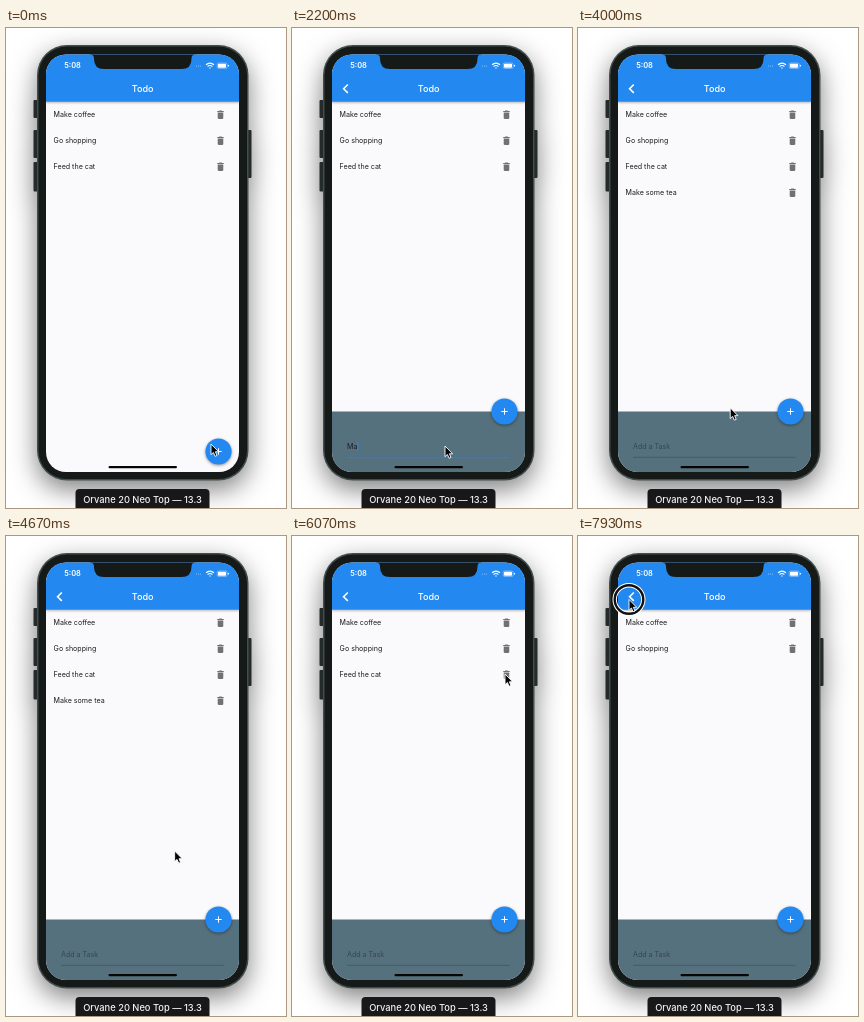
Recreate the animation shown at these times as an HTML page. Size 280 by 480 pixels, loop 8000 ms.

```html
<!DOCTYPE html>
<html lang="en">
<head>
<meta charset="utf-8">
<title>Todo</title>
<style>
  html, body { margin: 0; width: 100%; height: 100%; overflow: hidden; background: #fff; }
  svg { display: block; width: 100%; height: 100%; font-family: Inter, Roboto, sans-serif; }
  .body { filter: drop-shadow(0 9px 13px rgba(0, 0, 0, .5)); }
  .bar { filter: drop-shadow(0 1px 1px rgba(0, 0, 0, .3)); }
  .disc { filter: drop-shadow(0 1.5px 1.6px rgba(0, 0, 0, .4)); }
  .small { font-size: 7.1px; fill: #1c1c1d; white-space: pre; }
</style>
</head>
<body>
<svg viewBox="0 0 280 480">
  <defs>
    <clipPath id="screen"><rect x="40" y="26.5" width="193" height="417.5" rx="20"/></clipPath>
    <path id="bin" fill="#717173" transform="translate(208.9 81.2) scale(.466)"
      d="M6 19c0 1.1.9 2 2 2h8c1.1 0 2-.9 2-2V7H6zM19 4h-3.5l-1-1h-5l-1 1H5v2h14z"/>
  </defs>

  <g class="body">
    <g fill="#252b2b">
      <rect x="27.5" y="72" width="5" height="18" rx="1"/>
      <rect x="27.5" y="102" width="5" height="28" rx="1"/>
      <rect x="27.5" y="134" width="5" height="29.5" rx="1"/>
      <rect x="241" y="102" width="4.5" height="48" rx="1"/>
    </g>
    <rect x="31" y="17" width="211.5" height="435.5" rx="30" fill="#424e4c"/>
    <rect x="32.5" y="18.5" width="208.5" height="432.5" rx="28.5" fill="#151918"/>
  </g>

  <g clip-path="url(#screen)">
    <rect x="40" y="26" width="193" height="418" fill="#faf9fc"/>
    <g class="small" id="items">
      <g><text x="47.6" y="89.3">Make coffee</text><use href="#bin"/></g>
      <g transform="translate(0 26)"><text x="47.6" y="89.3">Go shopping</text><use href="#bin"/></g>
      <g transform="translate(0 52)"><text x="47.6" y="89.3">Feed the cat</text><use href="#bin"/></g>
      <g transform="translate(0 78)"><text x="47.6" y="89.3">Make some tea</text><use href="#bin"/></g>
    </g>

    <rect class="bar" x="40" y="20" width="193" height="53.7" fill="#2389f1"/>
    <path fill="#151918" d="M84 26.5Q88 26.5 88 30.5V31Q88 41 98 41H175.500Q185.500 41 185.500 31V30.500Q185.500 26.500 189.500 26.500V20H84Z"/>
    <g fill="#fff">
      <text x="58.2" y="40.400" font-size="7.5" font-weight="600">5:08</text>
      <text x="136.600" y="63.800" font-size="9.100" font-weight="500" text-anchor="middle">Todo</text>
      <g opacity=".5"><circle cx="190.500" cy="38" r=".6"/><circle cx="192.500" cy="38" r=".6"/><circle cx="194.500" cy="38" r=".6"/></g>
      <rect x="212" y="35.800" width="8" height="3.900" rx=".8"/>
      <rect x="222" y="36.800" width=".8" height="1.900" rx=".4"/>
    </g>
    <g fill="none" stroke="#fff">
      <path stroke-width="1.200" d="M200 36.800Q204 33.400 208 36.800M201.600 38.500Q204 36.500 206.400 38.500M203.300 40L204.700 40"/>
      <rect x="211.200" y="35" width="10" height="5.500" rx="1.500" stroke-width=".5" opacity=".7"/>
      <path id="back" stroke-width="1.600" d="M55.800 56.500L51.600 60.700L55.800 64.900"/>
    </g>

    <g id="sheet">
      <rect x="40" y="383.500" width="193" height="61" fill="#56717e"/>
      <path d="M55 429.300H217.500" stroke="#394b54" stroke-width=".6"/>
      <path id="focusLine" d="M55 429.300H217.500" stroke="#2389f1" stroke-width="1"/>
      <text class="small" id="hint" x="55" y="421" style="fill:#34464f">Add a Task</text>
      <text class="small" id="typed" x="55" y="421"></text>
      <rect id="caret" x="54.700" y="414" width="1" height="9" fill="#2389f1"/>
    </g>
    <g id="fab">
      <circle class="disc" cx="212.500" r="13.100" fill="#2389f1"/>
      <path d="M209.300 0H215.700M212.500 -3.200V3.200" stroke="#fff"/>
    </g>
    <rect x="102.500" y="437.900" width="68.500" height="2.400" rx="1.200" fill="#050505"/>
  </g>

  <rect x="69.500" y="461" width="134" height="24" rx="4" fill="#18181a"/>
  <text x="136.500" y="474.800" font-size="9.300" font-weight="500" text-anchor="middle" fill="#f2f2f2">Orvane 20 Neo Top — 13.3</text>

  <g id="pointer">
    <g id="ring" fill="none">
      <circle r="14.300" stroke="#fff" stroke-width="4.400"/>
      <circle r="14.300" stroke="#111" stroke-width="2.400"/>
    </g>
    <path d="M0 0V10.700L2.400 8.500L4.100 12.300L6 11.500L4.400 7.800H7.700Z"
      fill="#050505" stroke="#fff" stroke-width=".9" stroke-linejoin="round"/>
  </g>
</svg>

<script>
const LOOP = 8000;
const TASK = "Make some tea";
const SHEET_HEIGHT = 60.5;
const el = {};
for (const node of document.querySelectorAll("[id]")) el[node.id] = node;

const progress = (t, from, to) => Math.min(1, Math.max(0, (t - from) / (to - from)));
const smooth = p => p * p * (3 - 2 * p);
const easeOut = p => 1 - (1 - p) ** 2;
const linear = p => p;
const within = (t, from, to) => t >= from && t < to;
const show = (node, visible) => node.style.opacity = +visible;

// Pointer moves: start, end, destination x and y, easing
const moves = [
  [670, 1130, 153, 418, linear],
  [3650, 4150, 152, 369.500, smooth],
  [4450, 5100, 214, 166, smooth],
  [5640, 5940, 213, 138, smooth],
  [6970, 7800, 51, 63.500, smooth]
];
const clicks = [[5130, 5330], [6130, 6330], [7870, LOOP]];

function pointerAt(t) {
  let x = 205, y = 416;
  for (const [from, to, toX, toY, ease] of moves) {
    const p = ease(progress(t, from, to));
    x += (toX - x) * p;
    y += (toY - y) * p;
  }
  return [x, y];
}

function typedCount(t) {
  if (!within(t, 2000, 3600)) return 0;
  if (t < 2130) return 1;
  return Math.min(TASK.length, 2 + Math.max(0, Math.floor((t - 2230) / 97) + 1));
}

function render(t) {
  const open = easeOut(progress(t, 290, 530));
  const drop = SHEET_HEIGHT * (1 - open);
  el.sheet.setAttribute("transform", `translate(0 ${drop})`);
  el.fab.setAttribute("transform", `translate(0 ${Math.min(423.500, 383.500 + drop)})`);
  show(el.back, open);

  const [, , third, fourth] = el.items.children;
  show(third, t < 6450);
  show(fourth, within(t, 3600, 5470));

  const count = typedCount(t);
  el.typed.textContent = TASK.slice(0, count);
  show(el.hint, count === 0);
  show(el.focusLine, progress(t, 780, 980) - progress(t, 3600, 3800));
  const caretX = count ? 55 + el.typed.getComputedTextLength() : 54.700;
  el.caret.setAttribute("x", caretX);
  const blink = t < 2000 ? 1 - progress(t, 1430, 1530) : 1;
  show(el.caret, within(t, 800, 3600) ? blink : 0);

  el.pointer.setAttribute("transform", `translate(${pointerAt(t)})`);
  show(el.ring, clicks.some(([from, to]) => within(t, from, to)));
}

const start = performance.now();
function frame() {
  render((performance.now() - start) % LOOP);
  requestAnimationFrame(frame);
}
frame();
</script>
</body>
</html>
```
